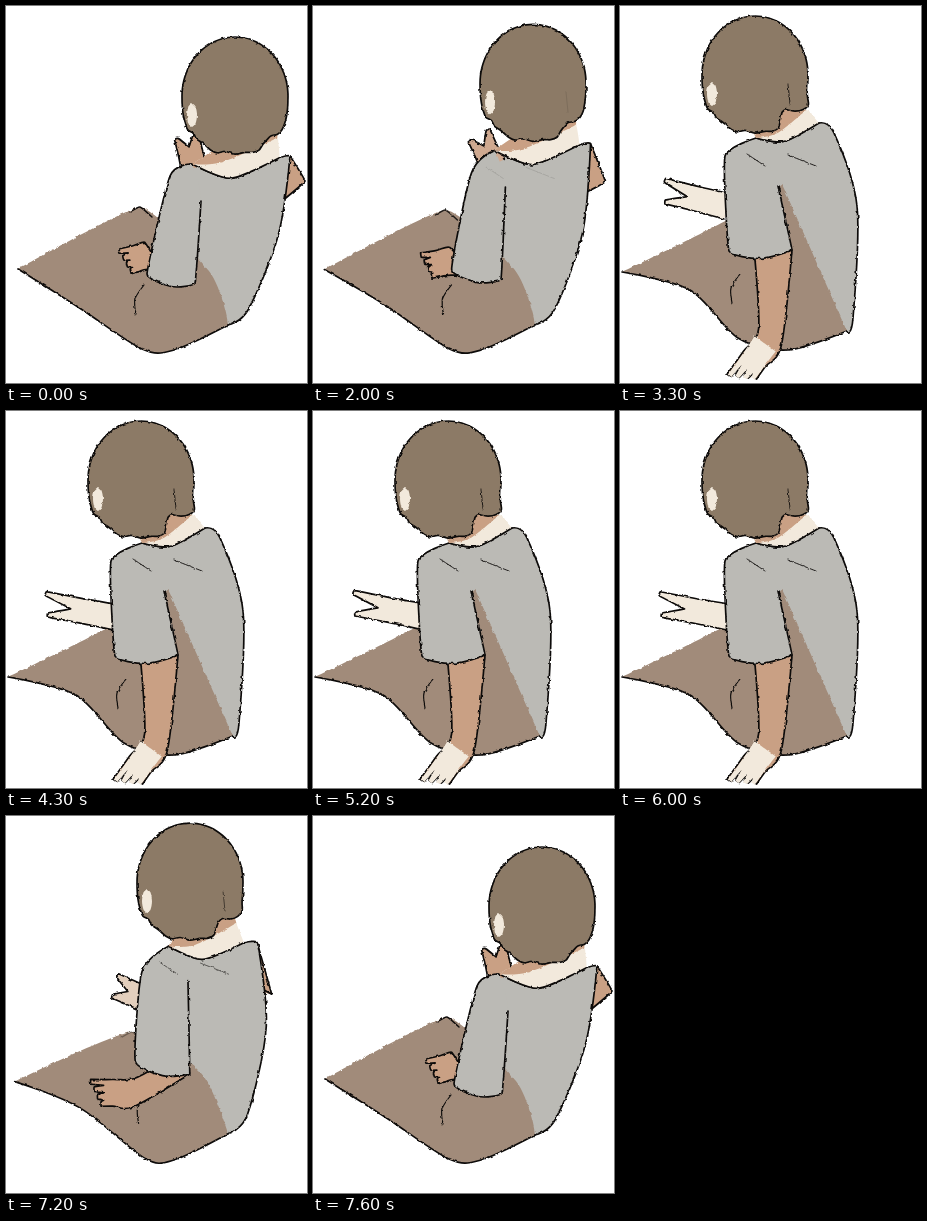
An HTML page that plays this animation: 301 px wide and 377 px high, repeating every 7.7 s.

```html
<!DOCTYPE html>
<html lang="en">
<head>
<meta charset="utf-8">
<title>Turning figure</title>
<style>
  html, body { margin: 0; width: 100%; height: 100%; overflow: hidden; background: #fff; }
  svg { display: block; width: 100%; height: 100%; }
  path { stroke-linecap: round; stroke-linejoin: round; }
</style>
</head>
<body>
<svg viewBox="0 0 301 377">
  <filter id="rough" x="0" y="0" width="301" height="377" filterUnits="userSpaceOnUse" color-interpolation-filters="sRGB">
    <feTurbulence type="fractalNoise" baseFrequency=".22" numOctaves="2" seed="4"/>
    <feDisplacementMap in="SourceGraphic" scale="3" xChannelSelector="R" yChannelSelector="G"/>
  </filter>
  <g id="figure" filter="url(#rough)"></g>
</svg>
<script>
const INK = '#0d0b0a', SHIRT = '#bbbab5', CLOTH = '#a18b7a', HAIR = '#8c7a66',
      SKIN = '#c9a084', LIGHT = '#f2e9dc';
const LOOP = 7700, STEP = 100;

// Where each joint is in the three key poses: turned away, leaning, seated.
const joints = {
  head: [[229, 90], [160, 62], [135, 69]],
  collarL: [[186, 158], [150, 124], [136, 132]],
  collarR: [[273, 152], [219, 122], [199, 117]],
  shoulderL: [[164, 170], [121, 148], [105, 150]],
  shoulderR: [[284, 150], [234, 124], [214, 127]],
  elbowR: [[299, 175], [248, 180], [230, 180]],
  side: [[272, 230], [254, 200], [237, 200]],
  hip: [[242, 304], [241, 296], [233, 312]],
  hem: [[222, 319], [222, 317], [227, 325]],
  armpit: [[195, 195], [175, 157], [158, 180]],
  cuffL: [[141, 268], [123, 233], [109, 245]],
  cuffR: [[189, 277], [181, 248], [172, 244]],
  wrist: [[142, 250], [120, 291], [150, 331]],
  fingers: [[116, 256], [68, 288], [118, 376]],
  farWrist: [[188, 162], [122, 207], [107, 200]],
  farFingers: [[180, 128], [69, 200], [43, 184]],
  apex: [[203, 265], [190, 252], [162, 178]],
  lap: [[134, 201], [122, 224], [107, 214]],
  tip: [[12, 263], [7, 267], [2, 266]],
  shin: [[72, 301], [75, 287], [70, 284]],
  seat: [[136, 343], [140, 342], [118, 332]]
};
// The upper body rises while it turns.
const lifted = ['head', 'collarL', 'collarR', 'shoulderR', 'armpit', 'farWrist', 'farFingers'];

// [time, pose]
const timeline = [[0, 0], [1900, 0], [2000, 0.13], [2500, 1], [2700, 1.75], [2800, 2],
                  [6500, 2], [6800, 1.75], [7000, 1], [7500, 0.13], [7600, 0], [LOOP, 0]];
// [start, period, count] of the hand's beats
const taps = [[3200, 600, 1], [4100, 425, 4], [5800, 400, 1]];

const clamp = v => Math.max(0, Math.min(1, v));
const mix = (a, b, k) => a + (b - a) * k;
const between = (p, q, k) => p.map((v, i) => mix(v, q[i], k));
const shift = ([x, y], dx, dy) => [x + dx, y + dy];
const unit = ([x, y]) => { const l = Math.hypot(x, y) || 1; return [x / l, y / l]; };
const noise = i => { const v = Math.sin(i * 12.99) * 43758; return v - Math.floor(v); };
const bump = (x, centre, width) => Math.exp(-(((x - centre) / width) ** 2));

function poseAt(t) {
  const i = timeline.findIndex(([end]) => end > t);
  const [[t0, p0], [t1, p1]] = [timeline[i - 1], timeline[i]];
  return mix(p0, p1, (t - t0) / (t1 - t0));
}

function tapAt(t) {
  for (const [start, period, count] of taps) {
    const beat = (t - start) / period;
    if (beat > 0 && beat < count) return Math.sin(Math.PI * beat) ** 4;
  }
  return 0;
}

function jointsAt(pose, tap) {
  const i = Math.min(1, Math.floor(pose)), j = {};
  for (const name in joints) j[name] = between(joints[name][i], joints[name][i + 1], pose - i);
  const lift = 10 * Math.sin(Math.PI * Math.sqrt(clamp(pose)));
  for (const name of lifted) j[name] = shift(j[name], 0, -lift);
  j.farWrist = shift(j.farWrist, tap, 6 * tap);
  j.farFingers = shift(j.farFingers, -5 * tap, 9 * tap);
  return j;
}

// A smooth line through the points that stays sharp at corners.
function curve(points, closed) {
  const n = points.length;
  const at = i => closed ? points[(i + n) % n] : points[Math.max(0, Math.min(n - 1, i))];
  const handle = i => {
    const [p, a, q] = [at(i - 1), at(i), at(i + 1)];
    const u = unit([a[0] - p[0], a[1] - p[1]]), v = unit([q[0] - a[0], q[1] - a[1]]);
    const k = 0.17 * Math.max(0, u[0] * v[0] + u[1] * v[1]);
    return [(q[0] - p[0]) * k, (q[1] - p[1]) * k];
  };
  let d = 'M' + points[0];
  for (let i = 0; i < (closed ? n : n - 1); i++) {
    const a = at(i), b = at(i + 1), [hx, hy] = handle(i), [gx, gy] = handle(i + 1);
    d += `C${shift(a, hx, hy)} ${shift(b, -gx, -gy)} ${b}`;
  }
  return d;
}

const path = (d, fill, stroke, width, opacity) =>
  `<path d="${d}" fill="${fill}" stroke="${stroke}" stroke-width="${width}" opacity="${opacity}"/>`;
const area = (points, fill, opacity = 1) => path(curve(points, true), fill, 'none', 0, opacity);
const line = (points, width = 1.7, opacity = 1) => path(curve(points), 'none', INK, width, opacity);
// Fills the shape and inks its first points.
const shape = (points, fill, inked = points.length) => area(points, fill) + line(points.slice(0, inked));

function hand(wrist, end, width, count, gap) {
  const [dx, dy] = [end[0] - wrist[0], end[1] - wrist[1]], [ux, uy] = unit([dx, dy]);
  const at = (along, across) =>
    [wrist[0] + dx * along - uy * across * width, wrist[1] + dy * along + ux * across * width];
  const points = [at(0, 1), at(gap * 0.7, 0.95)];
  for (let i = 0; i < count; i++) {
    const reach = 1 - 0.08 * i, across = 0.8 - 1.6 * i / (count - 1);
    points.push(at(reach, across + 0.16), at(reach, across - 0.16));
    if (i < count - 1) points.push(at(gap, across - 0.8 / (count - 1)));
  }
  return [...points, at(gap * 0.7, -0.95), at(0, -1)];
}

function hair(head, turn) {
  const points = [];
  for (let deg = 0; deg < 360; deg += 7.5) {
    const c = Math.cos(deg * Math.PI / 180), s = Math.sin(deg * Math.PI / 180);
    const power = s > 0 ? 0.8 : 1;
    const fringe = s > 0.5 ? 0.06 * noise(deg) : 0;
    const r = 1 - fringe - 0.2 * mix(0.3, 1, turn) * bump(deg, 50, 13) + 0.08 * turn * bump(deg, 24, 7);
    points.push(shift(head, 53 * r * Math.sign(c) * Math.abs(c) ** power,
                            59 * r * Math.sign(s) * Math.abs(s) ** power));
  }
  return [...points, points[0]];
}

function oval([x, y], rx, ry) {
  return Array.from({ length: 8 }, (_, i) =>
    [x + rx * Math.cos(i * Math.PI / 4), y + ry * Math.sin(i * Math.PI / 4)]);
}

function draw(pose, tap) {
  const j = jointsAt(pose, tap), turn = clamp(pose), seated = clamp(pose * 2 - 2);
  const collar = shift(between(j.collarL, j.collarR, 0.45), 0, mix(17, 10, pose / 2));
  const nape = shift(j.head, 40, 25), jaw = shift(j.head, -5, 45);
  const cuff = shift(between(j.cuffL, j.cuffR, 0.5), 0, 8);
  const farHand = hand(j.farWrist, j.farFingers, 13, 2, 0.62);
  const palm = between(j.wrist, j.fingers, 0.15);
  const crease = (from, to) => line([shift(j.collarL, ...from), shift(j.collarL, ...to)], 0.9, turn);

  figure.innerHTML = [
    shape([j.shoulderR, j.elbowR, between(j.shoulderR, j.side, 0.55)], SKIN),
    shape([j.collarL, collar, j.collarR, j.shoulderR, j.side, j.hip, j.hem, [190, 320], j.cuffL], SHIRT, 7),
    shape([j.tip, j.shin, j.seat, [168, 344], j.hem, j.apex, j.lap], CLOTH, 5),
    line([shift(j.lap, -10, 5), j.lap, shift(j.lap, 12, 10)], 1.4, 1 - turn),
    line([shift(j.seat, 2, -64), shift(j.seat, -7, -50), shift(j.seat, -6, -35)], 1.2),
    area(farHand, SKIN), area(farHand, LIGHT, turn), line(farHand),
    shape([between(j.cuffL, j.cuffR, 0.4), ...hand(j.wrist, j.fingers, 14, 4, 0.7), j.cuffR], SKIN),
    area(hand(palm, j.fingers, 13, 4, 0.65), LIGHT, seated),
    shape([j.collarL, j.shoulderL, j.cuffL, cuff, j.cuffR, j.armpit], SHIRT),
    crease([-9, 16], [9, 28]),
    crease([32, 17], [60, 28]),
    shape([j.collarL, collar, j.collarR, nape, jaw], LIGHT, 3),
    area([j.collarL, jaw, nape, between(nape, j.collarR, 0.45), between(j.collarL, j.collarR, 0.35)], SKIN),
    shape(hair(j.head, turn), HAIR),
    line([shift(j.head, 33, 9), shift(j.head, 35, 29)], 0.9, turn),
    area(oval(shift(j.head, -43, 19), 5, 12), LIGHT)
  ].join('');
}

const figure = document.getElementById('figure');
let shown = -1;
function frame() {
  const t = Math.floor(performance.now() % LOOP / STEP) * STEP;
  if (t !== shown) draw(poseAt(t), tapAt(t));
  shown = t;
  requestAnimationFrame(frame);
}
frame();
</script>
</body>
</html>
```
